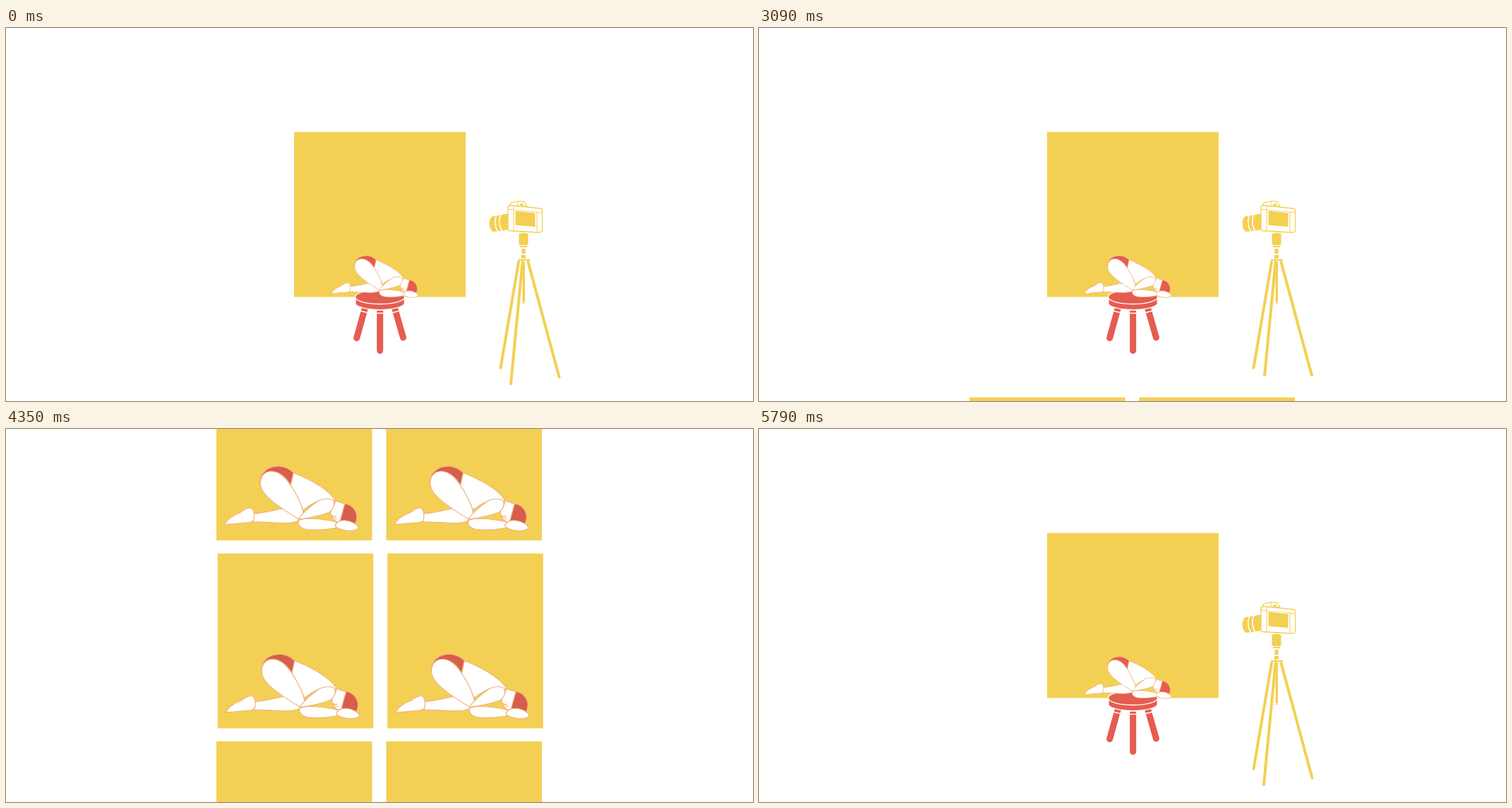
Recreate the animation shown at these times as an HTML page. Size 1058x529 px, loop 6.06 s.

```html
<!DOCTYPE html>
<html lang="en">
<head>
<meta charset="utf-8">
<title>Photo shoot</title>
<style>
  html, body { margin: 0; width: 100%; height: 100%; overflow: hidden; background: #fff; }
  svg { display: block; width: 100%; height: 100%; }
  .yellow { fill: #f3d054; }
  .yellow-line { fill: none; stroke: #f3d054; stroke-linecap: round; }
  .white-line { fill: none; stroke: #fff; }
  .outlined { fill: #fff; stroke: #f3d054; stroke-width: 1.3; stroke-linejoin: round; }
  #stool { color: #e55c50; }
</style>
</head>
<body>
<svg viewBox="0 0 1058 529">
  <defs>
    <radialGradient id="glow">
      <stop offset="0" stop-color="#fff"/>
      <stop offset=".6" stop-color="#fff" stop-opacity=".85"/>
      <stop offset="1" stop-color="#fff" stop-opacity="0"/>
    </radialGradient>

    <!-- Curled-up figure, origin at the top left of its bounds -->
    <g id="figure" transform="translate(-310 -243)" fill="#fff" stroke="#f2b27c" stroke-width="1.2" stroke-linejoin="round">
      <path d="M350 310C372 309 387 302 402 302L416 318C412 323 400 324 385 323C372 323 362 321 350 322Z"/>
      <path d="M310 325C313 318 322 312 331 309C336 305 342 301 347 302C351 304 352 311 351 318C350 322 345 323 340 323C330 323 318 326 310 325Z"/>
      <path d="M407 252C432 262 459 277 466 291L463 296C450 288 440 290 421 305C415 290 408 278 403 270Z"/>
      <path fill="currentColor" d="M360 269C358 252 372 242 388 243C397 244 403 248 407 252L403 270C397 258 386 250 376 250C366 250 360 258 360 269Z"/>
      <path d="M376 250C390 250 400 264 407 276C414 288 420 300 421 309C421 314 418 318 415 318C400 309 374 293 365 280C355 266 362 250 376 250Z"/>
      <path d="M465 297L467 291Q470 294 480 296L473 322Q467 322 465 319L462 317L463 314L460 311Q459 305 465 297Z"/>
      <path fill="none" d="M462 313Q465 316 468 313M464 317L469 317"/>
      <path fill="currentColor" d="M480 296C490 297 497 306 497 316Q496 322 494 325Q484 318 473 321Z"/>
      <path d="M414 318C420 309 432 299 442 292C450 288 460 288 464 292C466 299 463 304 458 308C448 312 430 316 414 318Z"/>
      <path d="M414 320C418 317 425 317 435 317C448 318 460 320 468 322V330C455 333 435 334 424 332C416 330 413 325 414 320Z"/>
      <path d="M466 327C468 321 475 319 482 320C490 321 499 326 499 330C497 335 485 335 477 333Q468 331 466 327Z"/>
    </g>

    <g id="card">
      <rect class="yellow" width="220.5" height="248"/>
      <use href="#figure" x="12" y="143"/>
    </g>
  </defs>

  <rect class="yellow" x="408" y="147.5" width="243" height="234"/>

  <g id="stool">
    <g fill="none" stroke="currentColor" stroke-width="9" stroke-linecap="round">
      <path d="M508.5 397L496.7 439.7M550.5 397L562.5 439M529.7 396V457.5"/>
    </g>
    <path class="white-line" stroke-width="1.5" d="M501 401L515 404.5M544 404.5L558 401M524 404.5H536M524 400H536"/>
    <path fill="currentColor" stroke="#fff" stroke-width="1.2" d="M495 384V391C497 396 512 399.5 529.5 399.5S562 396 564.3 391V384Z"/>
    <ellipse cx="529.6" cy="381.5" rx="35" ry="10" fill="currentColor" stroke="#fff" stroke-width="1.4"/>
    <use href="#figure" transform="translate(461 323) scale(.65)"/>
  </g>

  <g id="camera">
    <path class="yellow" d="M690 267C683 268 683 285 690 289L712 286V263Z"/>
    <path class="white-line" stroke-width="1.5" d="M696 264C691 270 692 284 698 290M702 263C697 270 698 283 704 289"/>
    <path class="outlined" d="M714 253L715 248Q725 244 734 246.500L738 253Z"/>
    <path class="outlined" d="M713 251.500L757 256Q759.500 256.500 759.500 259V287Q759 290 755 290L713 287.500Q711 287 711 285V254Q711 252 713 251.500Z"/>
    <path class="yellow-line" stroke-width="1" d="M711 257L759 262M719 252V288M752 261V290M725 246V252"/>
    <path class="yellow" d="M728 249L733 249.500V252L728 251.500Z"/>
    <path fill="#f3d054" stroke="#fff" d="M721 258.500L750 262V282.500L721 280Z"/>
    <rect class="yellow" x="731" y="288" width="4" height="2"/>
    <rect class="yellow" x="726.5" y="291" width="13" height="17" rx="2"/>
    <rect class="yellow" x="728" y="309" width="10" height="2"/>
    <path class="yellow" d="M730.500 313H735.500V320H730.500ZM730 322H736V327H730ZM725 328H742V330H725Z"/>
    <g class="yellow-line" stroke-width="4">
      <path stroke-width="3.5" stroke-linecap="butt" d="M733.300 331V391"/>
      <path class="white-line" stroke-width="1" d="M731 389.500H736"/>
      <path d="M726 332L700.500 482M731.500 332L715 504.500M739.500 332L783.500 495"/>
    </g>
  </g>

  <circle id="flash" cx="529" cy="264.5" fill="url(#glow)"/>

  <g id="gallery" color="#d75d4d">
    <rect y="-30" width="1058" height="841" fill="#fff"/>
    <use href="#card" x="298"/>
    <use href="#card" x="538.5"/>
    <use href="#card" x="299.7" y="266.5"/>
    <use href="#card" x="540.2" y="266.5"/>
    <use href="#card" x="298" y="533"/>
    <use href="#card" x="538.5" y="533"/>
  </g>
</svg>
<script>
  const LOOP = 6060, STEP = 30;
  const FLASH_LENGTH = 270;
  const FLASHES = [{ start: 930, radius: 285 }, { start: 2160, radius: 400 }];
  const SCROLL_SPEED = 0.4873; // px per ms
  const flash = document.getElementById('flash');
  const gallery = document.getElementById('gallery');

  function draw(now) {
    const time = Math.floor((now % LOOP) / STEP) * STEP;
    const active = FLASHES.find(f => time > f.start && time < f.start + FLASH_LENGTH);
    flash.setAttribute('r', active ? active.radius : 0);
    flash.setAttribute('opacity', active ? Math.sin(Math.PI * (time - active.start) / FLASH_LENGTH) : 0);

    const top = 524 - SCROLL_SPEED * (time - 3090);
    gallery.setAttribute('transform', `translate(0 ${top.toFixed(2)})`);
  }

  let begin;
  function tick(now) {
    begin ??= now;
    draw(now - begin);
    requestAnimationFrame(tick);
  }
  draw(0);
  requestAnimationFrame(tick);
</script>
</body>
</html>
```
